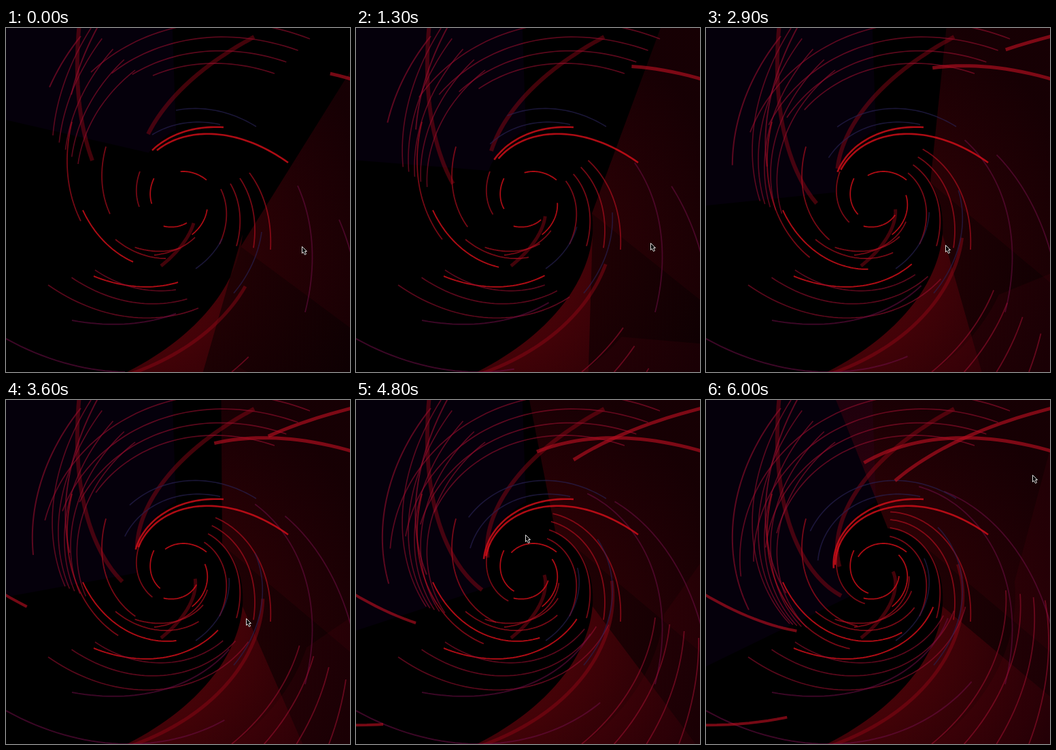
An HTML page with a canvas that plays this animation: 506 by 506 pixels, repeating every 6100 ms.

```html
<!DOCTYPE html>
<html>
<head>
<meta charset="utf-8">
<title>Red vortex</title>
<style>
  html, body { margin: 0; height: 100%; overflow: hidden; background: #000; }
  canvas { display: block; }
</style>
</head>
<body>
<canvas id="stage" width="506" height="506"></canvas>
<script>
const ctx = document.getElementById('stage').getContext('2d');
const LOOP = 6100, STEP = 100, CENTER = 253, FAR = 1200;
const SPIN = 9.6;      // degrees per second, shared by every stroke
const SETTLE = 100;    // degrees over which the inward pull fades
const RAD = Math.PI / 180;

const polar = ([x, y]) => [Math.atan2(y - CENTER, x - CENTER) / RAD, Math.hypot(x - CENTER, y - CENTER)];
const ray = (angle, r, [x, y] = [CENTER, CENTER]) => [x + r * Math.cos(angle * RAD), y + r * Math.sin(angle * RAD)];
const mix = (a, b, k) => a + (b - a) * k;
const faded = turned => 1 - Math.exp(-turned / SETTLE);

// Counterclockwise path through two points: it falls inward, ever more slowly.
function whirl(from, through) {
  const [start, r0] = polar(from), [angle, r1] = polar(through);
  const turned = (start - angle + 720) % 360;
  const pull = Math.log(r0 / r1) / faded(turned);
  const at = a => ray(a, r0 * Math.exp(-pull * faded(start - a)));
  const points = (a, b) => {
    const list = [];
    for (; a > b; a -= 2) list.push(at(a));
    return [...list, at(b)];
  };
  return { start, passed: start - turned, at, points };
}

function trace(points) {
  ctx.beginPath();
  points.forEach(p => ctx.lineTo(...p));
}

const layers = [];

function stroke(color, width, from, head, time = 0) {
  const path = whirl(from, head);
  layers.push(t => {
    const angle = path.passed - SPIN * (t - time);
    if (angle >= path.start) return;
    ctx.strokeStyle = color;
    ctx.lineWidth = width;
    trace(path.points(path.start, angle));
    ctx.stroke();
  });
}

// Strokes spread evenly between a first and a last one, each [start x, y, head x, y].
function bundle(count, color, width, first, last, time) {
  for (let i = 0; i < count; i++) {
    const [x, y, hx, hy] = first.map((v, j) => mix(v, last[j], i / (count - 1)));
    stroke(color, width, [x, y], [hx, hy], time);
  }
}

// Very wide stroke: a curved inner side and two straight ends, the head end turning.
function sheet(fill, path, tail, tailDir, head, headDir) {
  layers.push(t => {
    const corner = head(t), dir = headDir(t);
    const outline = path.points(tail, corner);
    outline.push(ray(dir, FAR, path.at(corner)));
    for (let a = dir + 10; a < tailDir; a += 10) outline.push(ray(a, FAR));
    outline.push(ray(tailDir, FAR, path.at(tail)));
    ctx.fillStyle = fill;
    trace(outline);
    ctx.fill();
  });
}

function glow(near, far) {
  const g = ctx.createRadialGradient(180, 330, 150, 180, 330, 380);
  g.addColorStop(0, `rgba(150,5,16,${near})`);
  g.addColorStop(1, `rgba(130,0,20,${far})`);
  return g;
}

const BRIGHT = 'rgba(215,16,26,.8)', RED = 'rgba(180,14,32,.65)', CRIMSON = 'rgba(150,14,45,.6)';
const VIOLET = 'rgba(110,14,70,.55)', BLUE = 'rgba(40,34,85,.65)', RIBBON = 'rgba(150,8,24,.45)';

const rightSide = whirl([178, 506], [323, 218]);
const leftSide = whirl([250, 150], [190, 240]);
const lowSide = whirl([320, 515], [440, 370]);
const rightHead = t => 36.6 - 19 * t, rightDir = t => -58 - 9 * t;

sheet('rgba(50,0,100,.11)', leftSide, leftSide.start, -92, t => -122 - 16.5 * t, t => -167 - 6.5 * t);
sheet(glow(0.22, 0.1), rightSide, rightSide.start, 125, rightHead, rightDir);
sheet(glow(0.1, 0.08), rightSide, -35, 40, rightHead, rightDir);
sheet(glow(0.3, 0.08), rightSide, rightSide.start, 125, () => 28, t => 106 - 11 * t);
sheet('rgba(130,0,20,.1)', lowSide, lowSide.start, 76, t => 70 - 11 * t, t => 27 - 17 * t);

bundle(2, RIBBON, 6, [365, 13, 209, 156], [108, -8, 127, 195]);
bundle(2, RIBBON, 5, [228, 350, 276, 287], [180, 510, 352, 380]);

// lower half
bundle(3, RED, 1.8, [218, 334, 278, 308], [161, 311, 235, 339]);
bundle(2, BRIGHT, 2, [113, 268, 187, 344], [129, 365, 253, 374]);
bundle(3, CRIMSON, 1.7, [131, 356, 250, 385], [62, 378, 283, 412]);
bundle(2, VIOLET, 2, [97, 430, 250, 420], [0, 457, 175, 506]);

// right
bundle(4, RED, 1.8, [389, 326, 358, 213], [314, 318, 316, 237]);
bundle(2, VIOLET, 1.8, [440, 418, 429, 232], [512, 350, 490, 282]);
bundle(2, BLUE, 1.6, [279, 354, 318, 310], [335, 390, 376, 300]);

// top and left
bundle(2, BLUE, 1.6, [368, 145, 250, 121], [315, 142, 215, 157]);
bundle(4, CRIMSON, 1.7, [395, 67, 216, 70], [447, 16, 125, 65]);
bundle(2, CRIMSON, 2, [135, -2, 96, 98], [110, 12, 64, 87]);
bundle(5, CRIMSON, 1.6, [125, 0, 69, 158], [190, 62, 106, 200]);
bundle(3, RED, 1.8, [97, 138, 110, 284], [197, 211, 196, 263]);
bundle(2, BRIGHT, 2.6, [320, 146, 215, 180], [415, 198, 222, 180]);

// coming in from outside; heads given for a later time
bundle(2, RED, 5, [530, 82, 266, 76], [525, 8, 320, 88], 4.8);
bundle(2, RED, 4, [-20, 275, 88, 328], [-20, 478, 40, 477], 4.8);
bundle(4, CRIMSON, 1.8, [332, 506, 440, 320], [475, 506, 504, 350], 4.8);

// small ring around the eye
for (let i = 0; i < 4; i++) {
  const angle = 69 + 103 * i, r = 36 + 3 * i;
  stroke(BRIGHT, 1.8, ray(angle + 50, r * 1.22), ray(angle, r));
}

// Pointer rests: time, x, y.
const rests = [[0, 435, 321], [1.3, 433, 316], [2.4, 352, 318], [3.6, 353, 321], [4.8, 249, 198], [6, 480, 110]];

function drawPointer(t) {
  const i = Math.max(1, rests.findIndex(rest => rest[0] >= t));
  const [t0, x0, y0] = rests[i - 1], [t1, x1, y1] = rests[i];
  const k = (t - t0) / (t1 - t0), eased = k * k * (3 - 2 * k);
  ctx.save();
  ctx.translate(Math.round(mix(x0, x1, eased)) + 0.5, Math.round(mix(y0, y1, eased)) + 0.5);
  trace([[0, 0], [0, 10], [2, 8], [4, 12], [6, 11], [4, 7], [7, 7]]);
  ctx.closePath();
  ctx.fillStyle = '#000';
  ctx.strokeStyle = '#ddd';
  ctx.lineWidth = 1;
  ctx.fill();
  ctx.stroke();
  ctx.restore();
}

function draw() {
  const t = Math.floor((performance.now() % LOOP) / STEP) * STEP / 1000;
  ctx.fillStyle = '#000';
  ctx.fillRect(0, 0, 506, 506);
  layers.forEach(layer => layer(t));
  drawPointer(t);
  requestAnimationFrame(draw);
}
draw();
</script>
</body>
</html>
```
